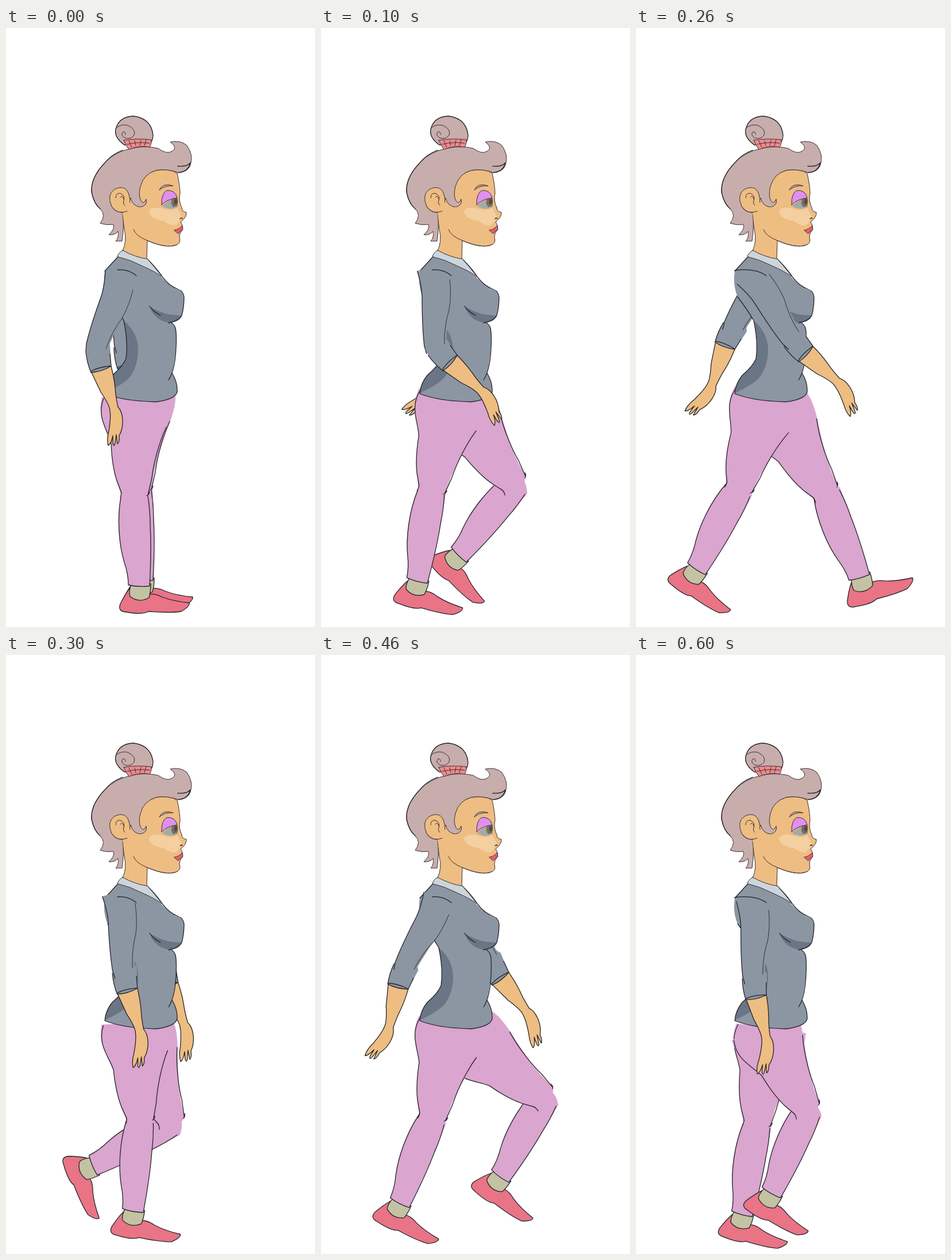
An HTML page for the animation above (700 ms loop, 538 by 1040 pixels).

```html
<!DOCTYPE html>
<html lang="en">
<head>
<meta charset="utf-8">
<title>Walk cycle</title>
<style>
  html, body { margin: 0; height: 100%; overflow: hidden; background: #fff; }
  svg { display: block; }
  path { fill: none; stroke-linecap: round; stroke-linejoin: round; }
  .line { stroke: #24242a; stroke-width: 1.3; }
  .thin { stroke: #3a3034; stroke-width: 1; }
  .hair { fill: #c7adac; }
  .skin { fill: #eebd82; }
  .knit { fill: #8b96a2; }
  .shade { fill: #6a7585; }
  .pants { fill: #daa5cf; }
  .shoe { fill: #e87486; }
  .sock { fill: #c3c2a2; }
</style>
</head>
<body>
<svg id="stage" width="538" height="1040" viewBox="0 0 538 1040"></svg>
<script>
const STEP = 100, STEPS = 7;
const p = (cls, d, fill) => `<path class="${cls}" d="${d}"${fill ? ` style="fill:${fill}"` : ''}/>`;

// Parts are drawn in the standing pose; `root` and `joint` are their pivots.
const leg = {
  root: [228, 650], joint: [224, 809],
  lower:
    p('shoe line', 'M215 970Q208 979 199 997Q194 1010 209 1011Q238 1016 248 1010Q285 1013 305 1010Q321 1001 319 995Q290 992 272 985Q260 979 251 980Z') +
    p('sock line', 'M218 962Q213 977 216 984Q232 996 249 986Q252 977 252 962Z') +
    p('pants', 'M200 806C192 850 196 895 206 925Q213 945 213 964Q230 968 250 966C253 910 252 860 249 806Q224 780 200 806Z') +
    p('line', 'M200 812C193 850 197 895 206 925Q213 945 213 964Q230 968 250 966C252 930 253 895 251 860Q251 835 247 810'),
  upper:
    p('pants', 'M167 638C157 680 181 695 184 725C185 765 192 785 201 806Q224 828 248 808C250 770 266 728 280 690C287 670 290 655 289 640Z') +
    p('line', 'M170 640C157 672 177 695 183 718C184 745 187 765 193 783L201 804M199 798Q202 806 199 812') +
    p('line', 'M279 690C264 722 256 760 254 778L247 808M250 802Q249 808 245 809'),
};

const arm = {
  root: [198, 430], joint: [162.5, 554.5],
  lower:
    p('skin line', 'M147 594L165 632Q180 654 181 664Q183 676 179 700Q175 715 178 725Q183 722 186 708L186 721Q188 729 190 720L192 706L194 722Q198 719 197 708Q204 695 203 680Q202 665 195 658Q191 640 190 625Q188 605 182 584Z') +
    p('knit', 'M139 555Q140 582 148 598Q167 597 183 587Q182 565 181 550Q160 525 139 555Z') +
    p('line', 'M139 562Q141 582 148 598M183 587L181 566') +
    p('line', 'M148 598Q167 597 183 587M148 596Q160 589 181 587'),
  upper:
    p('knit', 'M173 422Q170 452 165 468Q146 520 140 550Q140 566 150 574Q168 580 177 566L180 550L198 510Q214 480 221 455L205 425Z') +
    p('thin', 'M221 455Q214 483 202 504Q184 528 174 557') +
    p('line', 'M173 422Q171 452 165 468Q147 518 140 548L139 562'),
};

const torso =
  p('knit', 'M195 397L172 422Q168 446 177 467Q194 489 205 508Q214 545 209 574Q203 588 185 603Q173 618 172 635Q205 648 262 649Q294 645 298 632Q299 615 289 599Q298 560 296 525Q294 515 288 512Q305 508 306 499Q311 480 310 465Q309 457 295 453Q280 444 270 432L246 401Z') +
  p('shade', 'M205 508Q231 530 230 562Q228 593 212 610Q198 622 172 634Q173 618 185 603Q203 588 209 574Q214 545 205 508Z') +
  p('shade', 'M250 483Q275 500 306 499Q304 509 285 512Q258 508 250 483Z') +
  p('line', 'M195 397L172 422M177 467Q194 489 205 508Q213 545 209 574Q203 588 185 603Q173 618 172 635Q205 648 262 649Q294 645 298 632Q299 615 289 599M283 611Q292 598 295 570Q298 535 295 521Q293 515 288 512') +
  p('line', 'M246 401Q263 418 273 433Q283 447 300 454Q309 457 310 467Q310 485 306 499Q302 508 283 512M250 483Q256 492 269 499');

const head =
  p('skin thin', 'M262 247Q287 244 298 252Q303 275 303 287Q300 300 306 312Q306 319 314 320Q315 328 304 337Q309 344 307 351Q302 356 302 364Q305 372 298 376Q281 384 246 369L245 402Q225 398 203 387Q211 370 206 350L198 290L230 260Z') +
  p('hair line', 'M206 203Q188 190 191 176Q196 154 222 153Q253 157 256 186Q256 197 248 203Z') +
  p('thin', 'M191 174Q201 166 212 169Q227 176 223 186Q217 194 207 191Q199 186 203 181Q208 178 208 185') +
  p('hair thin', 'M215 210Q190 215 172 234Q147 260 149 285Q153 305 164 314Q175 325 164 339Q175 343 187 341Q190 349 179 359Q190 360 195 353Q197 364 191 370L202 370Q206 345 203 322L217 295Q220 309 234 311Q247 308 244 297Q240 307 235 300Q230 291 234 275Q240 253 262 247Q280 244 300 251Q317 250 321 238Q327 221 315 204Q304 194 286 198Q300 208 289 214Q280 220 265 209Q240 203 215 210Z') +
  p('line', 'M203 212Q183 220 172 234Q147 260 149 285Q153 305 164 314M300 251Q317 250 321 234Q316 241 299 240') +
  p('thin', 'M205 195Q228 191 253 194Q254 201 250 207Q232 203 214 211Q209 204 205 195ZM214 196L219 207M224 196L226 204M235 195L233 204M244 194L241 204M211 202Q231 197 250 200', '#ee8a8c') +
  p('skin thin', 'M211 318Q194 325 184 310Q175 289 189 280Q208 271 214 289Q219 304 211 318Z') +
  p('skin', 'M203 321L212 296L217 306Q225 312 235 311L230 350L207 350Z') +
  p('thin', 'M191 295Q191 286 199 287Q208 291 205 300Q203 304 207 308M199 294Q203 289 205 297M211 318Q194 325 184 310M222 350Q226 361 246 369Q281 384 298 376') +
  p('', 'M249 318Q255 308 275 314Q292 319 297 311L306 327Q300 343 292 343Q281 341 275 335Q250 332 249 318Z', '#f4cf9f') +
  p('', 'M272 309Q284 297 299 295L299 311Q287 317 275 311Z', '#a3aaa6') +
  p('', 'M290 295Q285 304 291 311L298 309Q301 301 298 294Z', '#7e6d5c') +
  p('', 'M294 297Q291 304 295 307L298 304V297Z', '#514b46') +
  p('thin', 'M271 307Q270 288 280 282Q295 281 298 295Q281 297 271 307Z', '#e08ff0') +
  p('hair thin', 'M267 281Q273 268 291 274Q277 273 267 281Z') +
  p('thin', 'M293 351Q301 350 307 343L308 350Q302 354 300 357Z', '#ef5a70') +
  p('line', 'M303 331Q306 329 307 331') +
  p('thin', 'M203 386Q195 391 194 397Q216 402 237 413Q258 422 272 432Q258 414 246 401Q225 398 203 386Z', '#cdd5dc');

const limb = ({ lower, upper }) => `<g class="limb"><g>${lower}</g>${upper}</g>`;
stage.innerHTML = limb(arm) + limb(leg) + limb(leg) + torso + head + limb(arm) +
  '<path id="seam" class="line"/>';

// Each pose: root x, root y, upper angle, lower angle.
const farArm = [[205, 420, -19, 4.5], [230, 410, -28, 48], [232, 403, 10, 37], [224, 419, -40, -4],
  [224, 420, -50, -20], [225, 420, -52, -26], [228, 410, -20, 0]];
const farLeg = [[234, 643, 0, 0], [246, 664, -37, 42], [250, 672, -32.5, -18.5], [236, 662, -21, 64.5],
  [266, 671, -53, 33], [241, 677, -21, -16], [234, 659, 7, 12.4]];
const nearLeg = [[228, 653, 0, 0], [228, 650, 11.5, 12], [228, 650, 16.5, 31], [228, 650, -3.5, 7.5],
  [228, 650, 11, 24], [228, 650, 7, 46], [226, 650, -29, 27]];
const nearArm = [[198, 430, 0, 0], [194, 421, -20, -30], [198, 430, -52, -30], [194, 417, -22.5, 1],
  [203, 423, 7.7, 31], [205, 426, 16, 39.5], [201, 427, -19.5, 4.5]];

const nodes = [...document.querySelectorAll('.limb')];
const rig = [[arm, farArm], [leg, farLeg], [leg, nearLeg], [arm, nearArm]];

function pose(step) {
  rig.forEach(([{ root, joint }, poses], i) => {
    const [x, y, upper, lower] = poses[step];
    nodes[i].setAttribute('transform',
      `translate(${x} ${y}) rotate(${upper}) translate(${-root[0]} ${-root[1]})`);
    nodes[i].firstElementChild.setAttribute('transform', `rotate(${lower - upper} ${joint})`);
  });
  // The shoulder seam reaches the back on every fourth step.
  seam.setAttribute('d', step % 4 === 2 ? 'M172 421Q207 416 227 430' : 'M194 420Q212 418 227 430');
}

function tick(now) {
  pose(Math.floor(now / STEP) % STEPS);
  requestAnimationFrame(tick);
}
pose(0);
requestAnimationFrame(tick);
</script>
</body>
</html>
```
